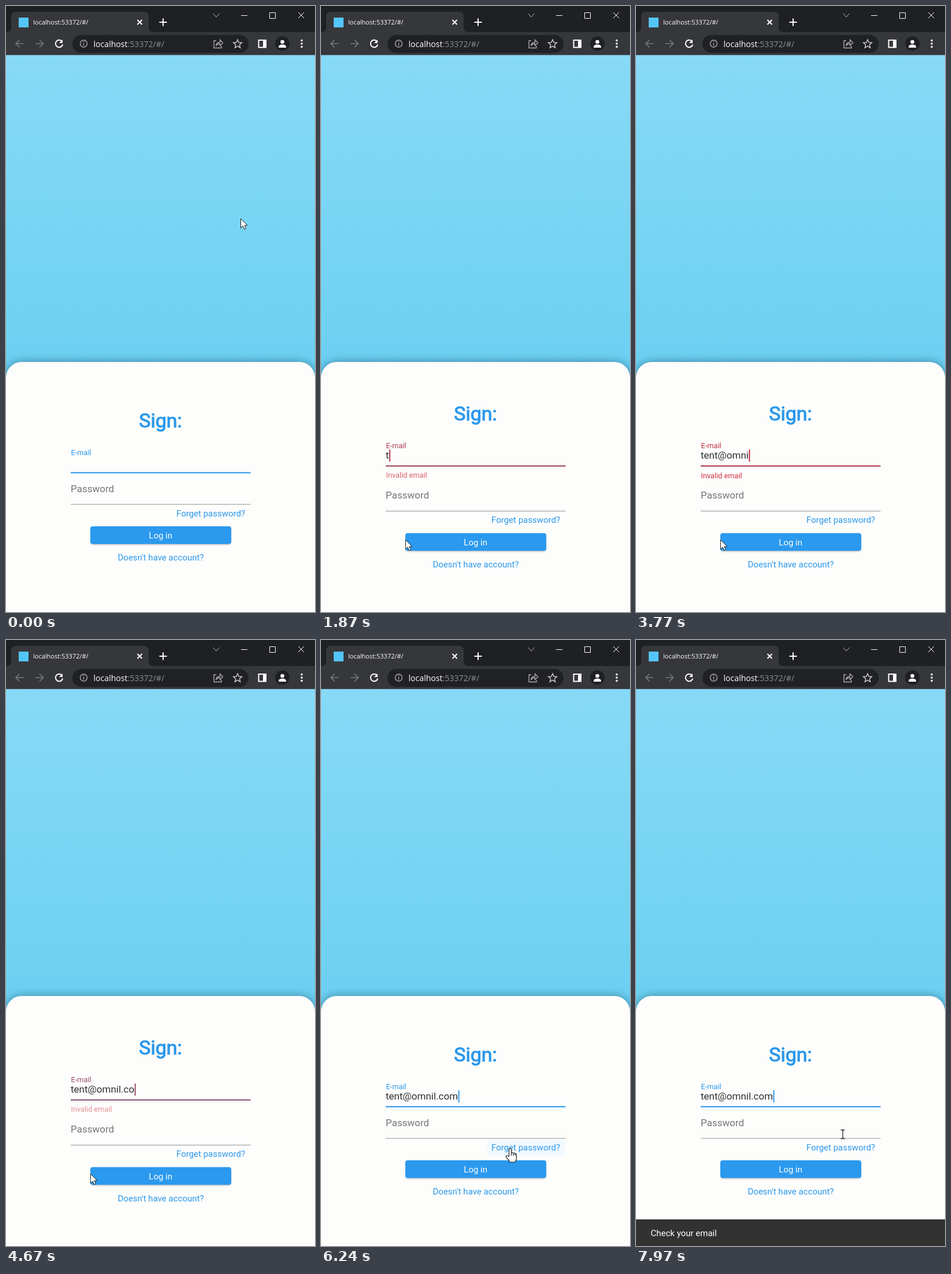
These frames come from a looping animation (535x1047 px, 8 s). An HTML page:

```html
<!DOCTYPE html>
<html lang="en">
<head>
<meta charset="utf-8">
<title>Sign in</title>
<style>
  html, body { margin: 0; width: 100%; height: 100%; overflow: hidden; background: #fdfdfc; }
  svg { display: block; }
  text { font-family: Roboto, sans-serif; white-space: pre; }
  .ui { font-family: "Open Sans", "Noto Sans", sans-serif; fill: #fff; }
  .small { font-size: 12.75px; }
  .field { font-size: 17px; }
  .link { font-size: 15px; fill: #2b98ec; }
  .white { fill: #fff; }
  .mid { text-anchor: middle; }
  .line { fill: none; stroke: #fff; }
</style>
</head>
<body>
<svg width="535" height="1047" viewBox="0 0 535 1047">
  <defs>
    <linearGradient id="sky" x2="0" y2="1">
      <stop stop-color="#87daf7"/><stop offset="1" stop-color="#6bcff0"/>
    </linearGradient>
    <filter id="soft" x="-10%" y="-10%" width="120%" height="120%"><feGaussianBlur stdDeviation="8"/></filter>
    <filter id="near" x="-10%" y="-50%" width="120%" height="200%"><feGaussianBlur stdDeviation="1.5"/></filter>
  </defs>

  <!-- Browser bar -->
  <rect width="535" height="46" fill="#1f2024"/>
  <path d="M1 45Q9 45 9 37V18Q9 10 17 10H239Q247 10 247 18V37Q247 45 255 45H535V86H0V45Z" fill="#36373b"/>
  <rect x="22" y="20" width="17" height="17" fill="#54c5f8"/>
  <text class="ui" x="47" y="32" font-size="11">localhost:53372/#/</text>
  <g class="line" stroke-width="2">
    <path d="M227.500 24l8 8M235.500 24l-8 8M265.500 28h13M272 21.500v13"/>
    <path d="M97.300 61.500A6.300 6.300 0 1 0 98.200 66.500"/>
    <path d="M98 58v6h-6z" fill="#fff" stroke="none"/>
    <path d="M30.500 65H17.500M23.500 58.500L17 65l6.500 6.500M51 65h13M58 58.500l6.500 6.500-6.500 6.500" stroke="#77787c" stroke-width="1.700"/>
  </g>
  <g class="line" stroke-width="1">
    <path d="M358.500 13l5.500 6 5.500-6" stroke="#bbb"/>
    <path d="M407 16.500h11M456.500 11.500h10v10h-10zM506 11l10 10M516 11l-10 10"/>
  </g>
  <rect x="115" y="50" width="305" height="31" rx="15.500" fill="#202125"/>
  <g fill="none" stroke="#aaa" stroke-width="1.400">
    <circle cx="134.500" cy="65" r="6"/>
    <path d="M134.500 64v4.500M134.500 61v1.500"/>
    <path d="M364 60h-4v12.500h13V69M363.500 69q1-6.500 7-6.500V58.500l5 5-5 5V65q-4.500 0-7 4z"/>
    <path d="M401 58l2.100 5 5.300.4-4.100 3.500 1.300 5.300-4.600-2.900-4.600 2.900 1.300-5.300-4.100-3.500 5.300-.4z" stroke="#ccc"/>
  </g>
  <text class="ui" x="151.500" y="70.500" font-size="14.100">localhost<tspan fill="#8e9094">:53372/#/</tspan></text>
  <path d="M436.500 58h14.500v14.500h-14.500zM438.500 60v10.500h6.500V60z" fill="#fff" fill-rule="evenodd"/>
  <circle cx="478.500" cy="65" r="12.500" fill="#1f2024"/>
  <circle cx="478.500" cy="62" r="3.300" fill="#fff"/>
  <path d="M472 72v-2q1-3.500 6.500-3.500T485 70v2z" fill="#fff"/>
  <g fill="#fff"><circle cx="512" cy="59.500" r="1.800"/><circle cx="512" cy="65" r="1.800"/><circle cx="512" cy="70.500" r="1.800"/></g>

  <!-- Page -->
  <svg y="84.500" width="535" height="962.500">
    <rect width="535" height="580" fill="url(#sky)"/>
    <rect y="531" width="535" height="460" rx="27" fill="#17506f" opacity=".64" filter="url(#soft)"/>
    <path d="M0 963V557.500A27 27 0 0 1 27 530.500H508A27 27 0 0 1 535 557.500V963Z" fill="#fdfdfc"/>
  </svg>

  <g id="upper">
    <text class="mid" x="267.500" y="727.500" font-size="34" fill="#2b98ec" stroke="#2b98ec" stroke-width="1.100">Sign:</text>
    <text id="label" class="small" x="112.500" y="776">E-mail</text>
    <text id="email" class="field" x="112" y="794" fill="#303030"></text>
    <rect id="caret" y="778" width="2" height="21"/>
    <rect id="rule" x="112" width="311.500"/>
  </g>
  <text id="error" class="small" x="112.500" fill="#cf2f3c">Invalid email</text>
  <g id="lower">
    <text class="field" x="112" y="839.500" fill="#757575">Password</text>
    <rect x="112" y="860.500" width="311.500" height="1" fill="#929292"/>
    <rect id="glow" x="288" y="863" width="134" height="28" rx="3" fill="#f1f9fe"/>
    <text class="link" x="295" y="881.500">Forget password?</text>
    <rect id="shade" x="147" width="242" height="30" rx="4" opacity=".3" filter="url(#near)"/>
    <rect id="button" x="146" y="899" width="244" height="30.500" rx="4"/>
    <text class="link mid white" x="267.700" y="920.300">Log in</text>
    <text class="link mid" x="268" y="958">Doesn't have account?</text>
  </g>

  <svg id="bar" width="535" height="46">
    <rect width="535" height="46" fill="#323232"/>
    <text id="note" x="25.500" y="28.500" font-size="15" fill="#fff">Check your email</text>
  </svg>

  <g id="pointer">
    <path id="arrow" d="M.5.5V16.500l3.700-3.500 2.500 5.800 2.700-1.200-2.500-5.600H12z" fill="#fff" stroke="#222"/>
    <path id="beam" d="M-3.500-7.500h2.500l1 1 1-1h2.500M0-6.500v13M-3.500 7.500h2.500l1-1 1 1h2.500" fill="none" stroke="#222" stroke-width="1.300"/>
    <path id="hand" d="M-2.500 13V1.500Q-2.500-.5-.5-.5T1.500 1.500V7q2.500-1.200 3.500.7 2.500-1 3.200.8 2.300-.5 2.300 2V15.500q0 4-2.500 7.500H-1.500q-1-4-5.500-8-1.500-2.500.5-3.200 2-.3 4 2.200M1.500 7v5M5 8v4M8.200 9v3" fill="#fff" stroke="#222" stroke-width="1.200"/>
  </g>
</svg>

<script>
const LOOP = 8000, SHIFT = 11.7;
const ADDRESS = 'tent@omnil.com';
const FIRST_KEY = 1740, KEY_GAP = 240, VALID = 4630;
const BLUR = 6480, REFOCUS = 6870, SNACK = 6502;
const LAST_KEY = FIRST_KEY + (ADDRESS.length - 1) * KEY_GAP;
const BLUE = [43, 152, 236], RED = [196, 48, 62];

// time, x, y
const path = [
  [150, 406, 367], [600, 300, 660], [820, 228, 835], [1060, 211, 891],
  [1400, 146, 922], [5300, 146, 922], [5670, 292, 896], [6150, 328, 879],
  [6900, 328, 879], [7600, 358, 854]
];

const $ = id => document.getElementById(id);
const set = (id, attrs) => {
  for (const key in attrs) $(id).setAttribute(key, attrs[key]);
};
const ramp = (t, start, length) => Math.min(1, Math.max(0, (t - start) / length));
const smooth = p => p * p * (3 - 2 * p);
const mix = (a, b, p) => `rgb(${a.map((v, i) => Math.round(v + (b[i] - v) * p))})`;

// cubic-bezier(.4, 0, .2, 1)
function standardEase(x) {
  let low = 0, high = 1;
  for (let i = 0; i < 20; i++) {
    const s = (low + high) / 2, r = 1 - s;
    if (1.2 * r * r * s + .6 * r * s * s + s ** 3 < x) low = s; else high = s;
  }
  return 3 * (1 - low) * low * low + low ** 3;
}

function pointerAt(t) {
  const next = path.findIndex(point => point[0] > t);
  if (next < 0) return path.at(-1).slice(1);
  if (!next) return path[0].slice(1);
  const [t0, x0, y0] = path[next - 1], [t1, x1, y1] = path[next];
  const p = smooth((t - t0) / (t1 - t0));
  return [x0 + (x1 - x0) * p, y0 + (y1 - y0) * p];
}

function pointerKind(t) {
  if (t > 760 && t < 1150 || t > 7250) return 'beam';
  return t > 5730 ? 'hand' : 'arrow';
}

function caretOn(t) {
  if (t < FIRST_KEY) return t % 1000 >= 500;
  if (t < LAST_KEY) return true;
  if (t >= BLUR && t < REFOCUS) return false;
  return (t - (t < BLUR ? LAST_KEY : REFOCUS)) % 1000 < 500;
}

function draw(t) {
  const typed = t < FIRST_KEY ? 0 : Math.floor((t - FIRST_KEY) / KEY_GAP) + 1;
  const red = ramp(t, FIRST_KEY, 150) - ramp(t, VALID, 150);
  const shift = t >= FIRST_KEY && t < VALID + 150 ? SHIFT : 0;
  const focused = t < BLUR || t >= REFOCUS;
  const tint = focused ? mix(BLUE, RED, red) : '#757575';

  set('upper', { transform: `translate(0 ${-shift})` });
  set('lower', { transform: `translate(0 ${shift})` });
  $('email').textContent = ADDRESS.slice(0, typed);
  set('label', { fill: tint });
  set('rule', {
    y: focused ? 805.3 : 806, height: focused ? 2.1 : 1,
    fill: focused ? mix(BLUE, [172, 56, 68], red) : '#929292'
  });
  const width = typed ? $('email').getComputedTextLength() : 0;
  set('caret', { x: 112.5 + width, fill: tint, opacity: +caretOn(t) });
  set('error', { y: 812 + 3.5 * red, opacity: red * red });

  const hover = ramp(t, 5430, 120) - ramp(t, 5700, 120);
  set('button', { fill: mix([42, 153, 238], [60, 163, 240], hover) });
  set('shade', { y: 900.5 + 1.5 * hover });
  set('glow', { opacity: ramp(t, 5950, 100) - ramp(t, 7180, 100) });

  const open = ramp(t, SNACK, 250);
  set('bar', { y: 1047 - 46 * standardEase(open) });
  set('note', { opacity: ramp(open, .68, .32) });

  set('pointer', { transform: `translate(${pointerAt(t).map(v => Math.round(v))})` });
  const kind = pointerKind(t);
  for (const id of ['arrow', 'beam', 'hand']) set(id, { opacity: +(id === kind) });
}

const start = performance.now();
function tick() {
  draw((performance.now() - start) % LOOP);
  requestAnimationFrame(tick);
}
tick();
</script>
</body>
</html>
```
